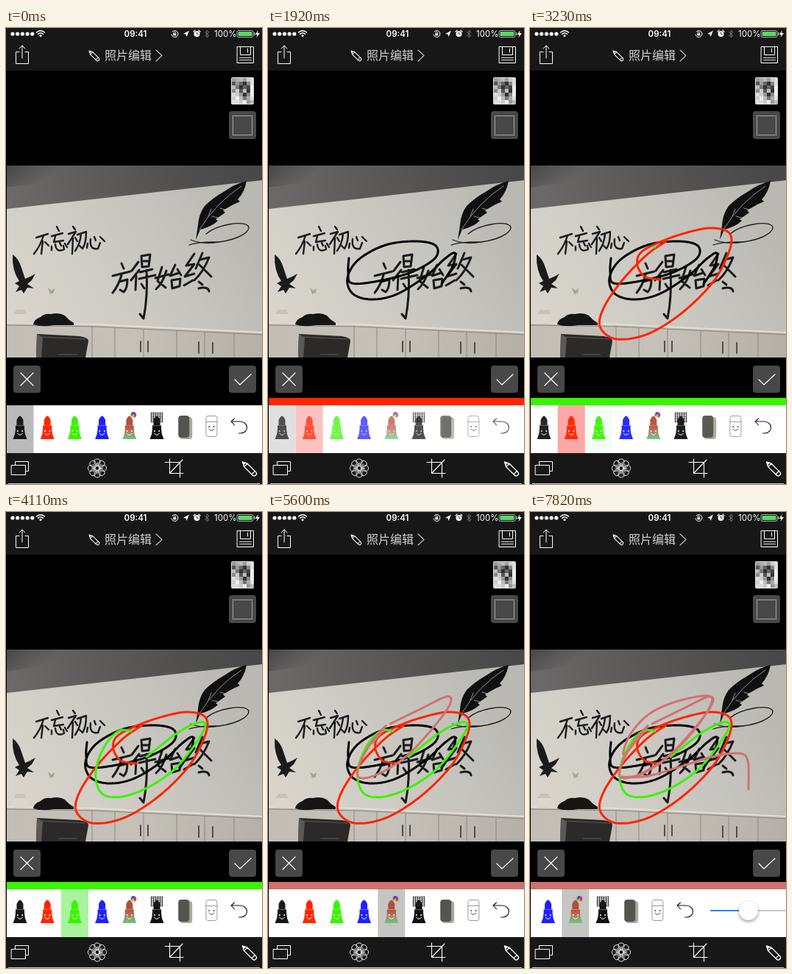
Animation, 348 px wide and 620 px high, one loop 8000 ms. Source, as an HTML page with a canvas:

```html
<!DOCTYPE html>
<html lang="zh">
<head>
<meta charset="utf-8">
<title>照片编辑</title>
<style>
html, body { margin: 0; width: 100%; height: 100%; overflow: hidden; background: #000; }
canvas { display: block; width: 348px; height: 620px; }
</style>
</head>
<body>
<canvas id="stage"></canvas>
<script>
const W = 348, H = 620, LOOP = 8000, STEP = 147.5, PITCH = 37.2;
const canvas = document.getElementById('stage');
const ratio = window.devicePixelRatio || 1;
canvas.width = W * ratio;
canvas.height = H * ratio;
const c = canvas.getContext('2d');

const clamp = v => Math.max(0, Math.min(1, v));
const ramp = (t, a, b) => clamp((t - a) / (b - a));
const ease = v => v * v * (3 - 2 * v);
const BLACK = '#000', RED = '#ff2500', GREEN = '#39f400', BLUE = '#1f20ff', PINK = '#d27270';

// ---------- drawing helpers ----------
function box(x, y, w, h, color) {
  c.fillStyle = color;
  c.fillRect(x, y, w, h);
}
function round(x, y, w, h, r, color, line) {
  c.beginPath();
  c.roundRect(x, y, w, h, r);
  if (color) { c.fillStyle = color; c.fill(); }
  if (line) { c.strokeStyle = line; c.lineWidth = 1; c.stroke(); }
}
function dot(x, y, r, color) {
  c.fillStyle = color;
  c.beginPath();
  c.arc(x, y, r, 0, 7);
  c.fill();
}
function fill(d, color) {
  c.fillStyle = color;
  c.fill(new Path2D(d));
}
function line(d, color = '#fff', width = 1.2) {
  c.strokeStyle = color;
  c.lineWidth = width;
  c.stroke(new Path2D(d));
}
function text(s, x, y, font, color, align = 'left') {
  c.font = font;
  c.fillStyle = color;
  c.textAlign = align;
  c.fillText(s, x, y);
}
function linear(x0, y0, x1, y1, ...colors) {
  const g = c.createLinearGradient(x0, y0, x1, y1);
  colors.forEach((v, i) => g.addColorStop(i / (colors.length - 1), v));
  return g;
}

// ---------- finger strokes ----------
function spline(pts) {
  const n = pts.length / 2, out = [];
  const at = (i, k) => pts[2 * Math.max(0, Math.min(n - 1, i)) + k];
  for (let i = 0; i < n - 1; i++) {
    for (let j = 0; j < 16; j++) {
      const u = j / 16;
      out.push([0, 1].map(k => {
        const a = at(i - 1, k), b = at(i, k), d = at(i + 1, k), e = at(i + 2, k);
        return b + u * (d - a + u * (2 * a - 5 * b + 4 * d - e + u * (3 * b - a - 3 * d + e))) / 2;
      }));
    }
  }
  out.push(pts.slice(-2));
  return out;
}
const strokes = [
  { color: BLACK, from: 600, to: 1460, pts: [110,313, 109,332, 114,347, 150,344, 195,332, 227,313, 228,296,
    202,290, 160,295, 123,315, 108,340, 115,361, 140,369, 175,362, 215,337, 240,314, 254,306, 251,324, 236,348] },
  { color: RED, from: 1920, to: 2780, pts: [177,342, 156,338, 146,322, 150,306, 172,293, 207,280, 245,272,
    271,279, 271,303, 249,345, 207,387, 160,416, 118,423, 96,408, 99,383, 123,346, 158,309, 185,290] },
  { color: GREEN, from: 3230, to: 4100, pts: [170,298, 155,297, 139,311, 126,336, 122,363, 132,384, 158,387,
    194,374, 231,348, 259,313, 271,291, 263,286, 235,299, 191,333] },
  { color: PINK, from: 5400, to: 5885, pts: [166,288, 205,269, 243,251, 247,262, 223,295, 187,333, 148,357,
    124,361, 124,344, 140,314, 160,291, 128,330, 136,303, 163,274, 205,256, 247,252, 229,289, 190,331,
    150,357, 124,360, 160,359, 205,346, 247,333, 283,328, 296,338, 297,377] }
];
strokes.forEach(s => s.path = spline(s.pts));

function drawStroke(s, t) {
  const p = ramp(t, s.from, s.to);
  if (!p) return;
  c.strokeStyle = s.color;
  c.lineWidth = 3;
  c.beginPath();
  s.path.slice(0, Math.ceil(p * s.path.length)).forEach(q => c.lineTo(...q));
  c.stroke();
}

// ---------- photo ----------
const brush = [
  'M41 285L57 280M51 282Q47 296 38 307M50 290L48 307M53 291L58 296',
  'M69 270L72 276M62 283L77 279M67 283L65 291L78 289M62 297V302M67 294Q68 306 79 301L78 296M73 292L75 296M80 293L83 298',
  'M91 270L94 274M85 280L95 277L84 294M91 286L90 307M94 285L97 290M97 281L109 277Q109 293 104 300L100 296M102 280Q101 293 94 303',
  'M111 293L110 299M115 287Q113 302 125 300L128 292M120 284L122 289M128 284L134 290'
];
const bigBrush = [
  'M157 320L160 327M145 337L169 331M157 336Q153 350 145 360M154 345L165 342Q165 354 160 359L155 356',
  'M180 318L171 330M181 329L170 343M177 337L176 356M184 310L185 325L194 324L196 308L184 310M185 317H195M182 332L199 328M181 341L203 336M191 329Q193 365 187 395L182 389M184 348L188 354',
  'M212 325L206 344L217 353M218 330Q213 347 204 355M203 340L221 335M230 322L223 337L235 333M233 328L238 336M225 343L226 354L236 351L237 341Z',
  'M256 307L245 323L256 321L243 338L256 334M242 350L254 343M267 306L258 327M264 315L276 312Q268 332 256 343M263 322L279 338M262 345L267 349M262 354Q275 351 276 358'
];

function photo() {
  c.save();
  c.beginPath();
  c.rect(1, 187, 347, 261);
  c.clip();
  box(0, 187, W, 261, linear(0, 400, 310, 230, '#dad6cd', '#d1cec7', '#c6c4be', '#bab8b3'));
  fill('M0 187H348V207L0 246Z', linear(20, 250, 330, 187, '#6b6967', '#5d5c5a', '#525150', '#484848'));
  fill('M0 187H210L0 217Z', linear(0, 187, 30, 225, '#464646', '#46464600'));

  // cabinets
  fill('M0 400L120 403L348 414V448H0Z', linear(0, 400, 348, 448, '#c2beb6', '#c5c1b9', '#b4b0a8'));
  line('M0 401L120 403L348 414', '#e4e0d8', 2);
  line('M0 404L120 406L348 417', '#8a867f', 1);
  line('M117 406V448M148 408V448M187 410V448M232 412V448M270 414V448M310 416V448', '#8c8881', 1);
  line('M183 426V440M193 426V440M262 427V442M281 428V442', '#514e49', 2);

  // things on the cabinets
  round(10, 387, 18, 15, 2, '#dbd7cd');
  fill('M10 389L14 383H25L28 389Z', '#c7c3ba');
  fill('M37 403Q38 396 47 393Q52 388 61 389Q72 386 80 391L86 397L92 401V404H65Q48 407 37 403Z', '#151514');
  fill('M42 416L100 419Q113 421 112 426L108 448H41Z', '#2b2a29');
  fill('M42 416L50 421L48 448H41Z', '#5b5956');
  line('M46 420L108 423M72 444H96', '#5c5a57', 1.2);

  // bird
  fill('M9 308Q17 313 21 326L26 341L33 338L40 334L35 343L29 348L38 354L29 353L24 361L21 356L13 359L18 351L12 347L18 344Q8 330 9 308Z', '#1b1b1b');
  fill('M57 353L62 357L66 354L65 360L60 362Z', '#a5a39f');

  // feather and flourish
  fill('M327 208Q311 212 297 222Q281 231 270 242Q262 253 261 268L258 288L264 274Q280 270 288 262L285 260L298 251L295 248L309 240L318 236L315 233Q324 224 327 208Z', '#101010');
  line('M320 215Q286 237 263 274M275 256L279 246M288 258L280 256M298 247L291 245', '#b4b2ad', .8);
  line('M251 288Q269 295 289 291C321 287 334 274 329 269C321 262 287 267 272 280M249 295Q264 290 291 291', '#1c1c1c', 1.3);

  brush.forEach(d => line(d, '#1b1b1b', 2.4));
  bigBrush.forEach(d => line(d, '#1b1b1b', 3));
  c.restore();
}

// ---------- fixed interface ----------
// A slim pencil whose tip points to the upper left.
function pencil(x, y, k) {
  c.save();
  c.translate(x, y);
  c.rotate(Math.PI / 4);
  c.scale(k, k);
  line('M0 0L4.5 -2.3H16Q18.5 -2.3 18.5 0T16 2.3H4.5ZM4.5 -2.3V2.3M15 -2.3V2.3', '#fff', 1);
  fill('M0 0L3 -1.5V1.5Z', '#fff');
  c.restore();
}

function statusBar() {
  for (let i = 0; i < 5; i++) dot(9 + i * 6.7, 8, 2.6, '#fff');
  line('M41.5 6Q47 1.5 52.5 6M43.6 8.2Q47 5.5 50.4 8.2', '#fff', 1.5);
  dot(47, 10.5, 1.5, '#fff');
  text('09:41', 176, 12, '600 11.5px Inter, Roboto, sans-serif', '#fff', 'center');
  line('M226 5A4.5 4.5 0 1 1 225 9', '#fff', 1);
  box(227.3, 7.3, 4, 3, '#fff');
  line('M228 7V5.7Q229.3 4.2 230.6 5.7V7', '#fff', .8);
  fill('M241 8L249 3.5L245.5 12L244.5 8.5Z', '#fff');
  dot(259.5, 8, 4, '#fff');
  line('M259.5 5.8V8.3H261.5', '#111', .8);
  line('M255 5L257 3M264 5L262 3', '#fff', 1.2);
  line('M270.5 5.3L276 10.5L273 13V3L276 5.5L270.5 10.7', '#777', 1);
  text('100%', 283, 12, '11.5px Inter, Roboto, sans-serif', '#fff');
  round(314, 3.5, 22, 9, 2, null, '#aaa');
  round(315.5, 5, 19, 6, 1, '#58d965');
  box(337, 6, 1.5, 4, '#aaa');
  fill('M342.5 3L339 9H341.5L340.5 13L345 7H342Z', '#fff');
}

function topBar() {
  box(0, 0, W, 58, '#171717');
  statusBar();
  line('M18 32.5H13.5V48.5H30.5V32.5H26M22 41V24M18 28L22 24L26 28', '#fff', 1);
  pencil(113, 31, 1);
  text('照片编辑', 134, 43, '300 16px "Noto Sans CJK SC", "Noto Sans CJK", sans-serif', '#cfcfcf');
  line('M204 30L212 37.5L204 45', '#bbb');
  line('M314.5 25.5H336.5V47.5H314.5ZM318.5 25.5V36.5H332.5V25.5M328.5 28V33', '#fff', 1);
  line('M317.5 40.5H333.5M317.5 43.5H333.5', '#ddd', 1);
}

function bottomBar() {
  box(0, 578, W, 42, '#171717');
  box(3, 619, W - 6, 1, '#c8c8c8');
  line('M12.5 594V589.5H30.5V602.5H27M7.5 594.5H26.5V607.5H7.5Z', '#fff', 1);
  for (let i = 0; i < 8; i++) {
    c.save();
    c.translate(124, 598.5);
    c.rotate(i * Math.PI / 4);
    line('M-1.3 -3C-5.5 -7 -5 -12.5 0 -12.5S5.5 -7 1.3 -3M0 -4V-7.5', '#fff', .9);
    c.restore();
  }
  c.beginPath();
  c.arc(124, 598.5, 3, 0, 7);
  c.stroke();
  line('M222.5 586V605.5H241M216 590.5H236.5V611M222.5 605.5L240 587', '#fff', 1.1);
  pencil(321.5, 590, 1.38);
}

const mosaic = ['9ab9cd', '59638d', 'b7364e', '8c5b3e', 'dc938e', 'ceb7ad', 'ddce9b'];
function sideButtons() {
  round(306, 67, 31, 37, 2, '#e0e0dc');
  mosaic.forEach((row, y) => [...row].forEach((v, x) => box(307 + x * 5, 68 + y * 5, 5, 5, '#' + v + v + v)));
  round(303, 113, 37, 38, 4, '#484848');
  c.setLineDash([1, 1]);
  c.lineCap = 'butt';
  line('M308 119.5H335M308 145.5H335M308.5 119V146M334.5 119V146', '#fff', 1);
  c.lineCap = 'round';
  c.setLineDash([]);
  round(10, 459, 37, 37, 4, '#484848');
  line('M20 469L37 486M37 469L20 486', '#fff', 1.2);
  round(303, 459, 37, 37, 4, '#484848');
  line('M311 478L318 485L333 471', '#fff', 1.2);
}

// ---------- tool strip ----------
function face(y, color = '#fff') {
  dot(-3.2, y, 1, color);
  dot(3.2, y, 1, color);
  line(`M-3.5 ${y + 3}Q0 ${y + 8} 3.5 ${y + 3}`, color, 1);
}
function pen(tip, body) {
  fill('M-4.5 540V533Q-2 527.5 0 527.5T4.5 533V540Z', tip);
  fill('M-6 540H6V545Q6 552 9.5 559H-9.5Q-6 552 -6 545Z', body);
  line('M-6 540.5H6', '#ffffff66', .8);
  face(548);
}
const rainbow = linear(0, 540, 0, 559, '#bf4632', '#a98065', '#5fce83');
const tools = [
  () => pen('#1c1c1c', '#151515'),
  () => pen(RED, RED),
  () => pen(GREEN, GREEN),
  () => pen(BLUE, BLUE),
  () => {
    pen('#b0513c', rainbow);
    ['#e33', '#fb3', '#3a3', '#33c', '#a3c'].forEach((v, i) => {
      c.fillStyle = v;
      c.beginPath();
      c.moveTo(5.5, 526);
      c.arc(5.5, 526, 4, i * 1.257, i * 1.257 + 1.257);
      c.fill();
    });
  },
  () => {
    pen('#111', '#111');
    for (let i = 0; i < 6; i++) {
      line(`M${-7.5 + i * 3} 523V536M-8 ${523.5 + i * 2.4}H8`, '#222', .8);
    }
  },
  () => {
    round(-6, 529, 17, 30, 4, '#a9a9a1');
    round(-8, 527, 15, 30, 4, '#55554f');
  },
  () => {
    round(-7.5, 527.5, 15, 28, 3, '#fff', '#999');
    line('M-7.5 535.5H7.5', '#999', 1);
    face(542, '#444');
  },
  () => line('M-6 531L-10.5 535L-6 540M-10.5 535H1C14 535 14 551 2 551H0', '#111', 1.1)
];

const picks = [
  { tool: 0, at: -1000, tint: '#bababa' },
  { tool: 1, at: 1765, tint: '#fba3a1' },
  { tool: 2, at: 3230, tint: '#a8f39d' },
  { tool: 4, at: 4250, tint: '#c5c5c1' }
];
function barColor(t) {
  if (t < 1760) return BLACK;
  if (t < 3185) return RED;
  return t < 4990 ? GREEN : '#cf716f';
}

function slider(x) {
  line('M352 542H462', '#b8b8b8', 1.6);
  line(`M352 542H${x}`, '#2186f5', 2);
  c.save();
  c.shadowColor = '#0006';
  c.shadowBlur = 4 * ratio;
  c.shadowOffsetY = 2 * ratio;
  dot(x, 542, 13, '#fff');
  c.restore();
}

function toolStrip(t) {
  box(1, 503, W, 10, barColor(t));
  box(1, 513, W, 65, '#fff');
  const scroll = 78 * ramp(t, 6500, 6637) + 28 * ramp(t, 6640, 6780);
  const now = picks.filter(p => p.at <= t).length - 1;
  const mix = ramp(t, picks[now].at, picks[now].at + 280);
  c.save();
  c.beginPath();
  c.rect(1, 513, W - 1, 65);
  c.clip();
  c.translate(-scroll, 0);
  picks.forEach((p, i) => {
    c.globalAlpha = i === now ? Math.pow(mix, .7) : i === now - 1 ? 1 - mix : 0;
    box(p.tool * PITCH + .5, 513, 37, 65, p.tint);
  });
  c.globalAlpha = 1 - .27 * Math.sin(Math.PI * mix);
  tools.forEach((draw, i) => {
    c.save();
    c.translate(19 + i * PITCH, 0);
    draw();
    c.restore();
  });
  c.globalAlpha = 1;
  slider(370 + 33 * ease(ramp(t, 6900, 7670)));
  c.restore();
}

const swatches = [
  'fdfdfb a8a8a4 383838 ecd8d2 a47070 350000 a8a8a4 a43a3a ff7070 ff2200',
  'd8d8d4 747472 000000 c8b4ac 703838 fca4a4 cc403a 6c0800 fc483c d81800'
];
function palette() {
  box(1, 503, W, 75, '#92928e');
  swatches.forEach((row, y) => row.split(' ').forEach((v, x) =>
    box(1 + x * 37.3, 504 + y * 37.3, 35.8, 36, '#' + v)));
}

// ---------- timeline ----------
function render(t) {
  c.setTransform(ratio, 0, 0, ratio, 0, 0);
  c.lineCap = c.lineJoin = 'round';
  box(0, 0, W, H, '#000');
  topBar();
  photo();
  strokes.forEach(s => drawStroke(s, t));
  sideButtons();
  toolStrip(t);
  if (t > 4400 && t < 4990) palette();
  bottomBar();
}

const start = performance.now();
function tick() {
  const t = (performance.now() - start) % LOOP;
  render(Math.floor(t / STEP + .15) * STEP);
  requestAnimationFrame(tick);
}
tick();
</script>
</body>
</html>
```
